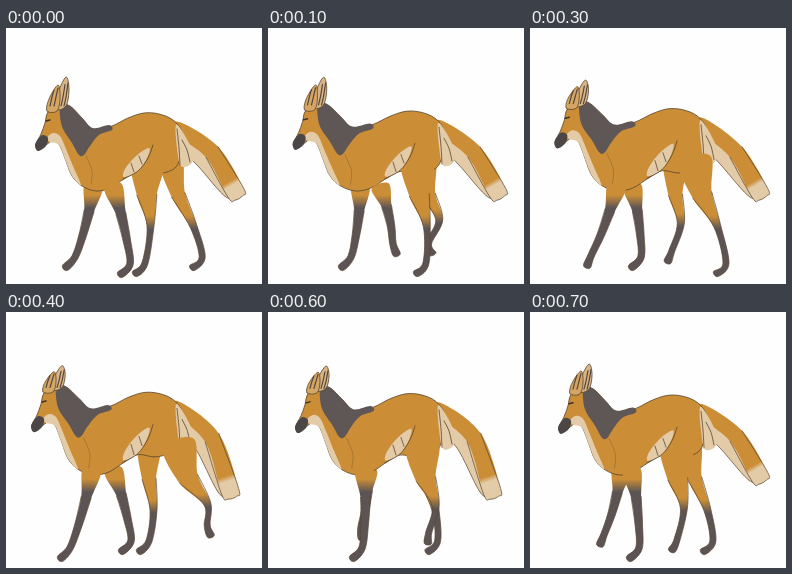
An HTML page with a canvas that plays this animation: 256 px wide and 256 px high, repeating every 800 ms.

```html
<!DOCTYPE html>
<html>
<head>
<meta charset="utf-8">
<style>
html, body { margin: 0; width: 100%; height: 100%; overflow: hidden; background: #fefefe; }
canvas { display: block; width: 100vw; height: 100vh; }
</style>
</head>
<body>
<canvas id="stage"></canvas>
<script>
const canvas = document.getElementById('stage');
const ctx = canvas.getContext('2d');
const ratio = window.devicePixelRatio || 1;
canvas.width = innerWidth * ratio;
canvas.height = innerHeight * ratio;

const ORANGE = '#cb8e37', DARK = '#5c5454', CREAM = '#e3cba8', LINE = '#59452fcc';
const STEP = 100, COUNT = 8;

// The foot slides back from `x` by `stride` per step, for `push` steps,
// then swings forward; it is in the air from step `off` on.
const legs = {
  frontNear: { phase: 4, x: 54, stride: 15, push: 5, off: 4, snap: 3, lift: 20, ground: 247 },
  frontFar: { phase: 0, x: 59, stride: 14, push: 5, off: 4, snap: 1.7, lift: 16, ground: 240 },
  hindNear: { phase: 0, x: 129, stride: 19, push: 4, off: 3, snap: 1.3, lift: 22, ground: 246, hind: true },
  hindFar: { phase: 4, x: 133, stride: 13.3, push: 4, off: 4, snap: 1.8, lift: 14, ground: 240, hind: true, slim: 0.7 }
};

const clamp = v => Math.max(0, Math.min(1, v));
const mix = (a, b, k) => a + (b - a) * k;
const arc = u => Math.sin(Math.PI * u);       // 0 - 1 - 0
const flick = u => arc(Math.sqrt(clamp(u)));  // same, with an early peak
const pairs = a => a.flatMap((v, i) => i % 2 ? [] : [[v, a[i + 1]]]);

// Smooth curve through all points
function curve(p, closed) {
  const n = p.length;
  const at = i => closed ? p[(i + n) % n] : p[Math.max(0, Math.min(n - 1, i))];
  ctx.beginPath();
  ctx.moveTo(...p[0]);
  for (let i = 0; i < (closed ? n : n - 1); i++) {
    const [a, b, c, d] = [at(i - 1), at(i), at(i + 1), at(i + 2)];
    ctx.bezierCurveTo(b[0] + (c[0] - a[0]) / 6, b[1] + (c[1] - a[1]) / 6,
      c[0] - (d[0] - b[0]) / 6, c[1] - (d[1] - b[1]) / 6, c[0], c[1]);
  }
}

function stroke(color, width = 1) {
  ctx.strokeStyle = color;
  ctx.lineWidth = width;
  ctx.stroke();
}

function shape(p, fill, line) {
  curve(p, true);
  ctx.fillStyle = fill;
  ctx.fill();
  if (line) stroke(line);
}

// Tapered limb, outlined along its sides from the given joint
function limb(p, widths, fill, from = 1) {
  const left = [], right = [];
  p.forEach(([x, y], i) => {
    const a = p[Math.max(0, i - 1)], b = p[Math.min(p.length - 1, i + 1)];
    const dx = b[0] - a[0], dy = b[1] - a[1], k = widths[i] / 2 / Math.hypot(dx, dy);
    left.push([x + dy * k, y - dx * k]);
    right.unshift([x - dy * k, y + dx * k]);
  });
  shape([...left, ...right], fill);
  curve([...left.slice(from), ...right.slice(0, right.length - from)], false);
  stroke(LINE, 0.9);
}

function leg({ phase, x, stride, push, off, snap, lift, ground, hind, slim = 1 }, t) {
  const p = (t + phase) % COUNT;
  const swing = clamp((p - push) / (COUNT - push));
  const air = flick((p - off) / (COUNT - off));
  const toe = [x + (p < push ? stride * p : stride * push * (1 - swing) ** snap), ground - lift * air];
  const ankle = [toe[0] + 10 - 14 * air, toe[1] - 11];
  const fur = y => {
    const g = ctx.createLinearGradient(0, y, 0, y + 13);
    g.addColorStop(0, ORANGE);
    g.addColorStop(1, DARK);
    return g;
  };
  if (hind) {
    const hip = [157 + 0.4 * (toe[0] - 167), 131];
    const knee = [hip[0] + 0.15 * (toe[0] - 135), 167];
    const hock = [173 + 0.75 * (toe[0] - 167), 198 - 6 * air];
    limb([hip, knee, hock, ankle, toe], [32 * slim, 20 * slim, 7, 6, 7], fur(hock[1] - 10));
  } else {
    const top = [96 + 0.35 * (toe[0] - 83), 158];
    const along = k => [mix(top[0], ankle[0], k) + 2, mix(top[1], ankle[1], k)];
    limb([top, along(0.35), along(0.7), ankle, toe], [18, 10, 7.5, 6.5, 7], fur(167));
  }
}

function tail([x, y], t) {
  const droop = Math.sqrt(Math.max(0, Math.cos((t - 5) * Math.PI / 4)));
  const mid = [206, 124 + 2 * droop];
  const tip = [230 - 7 * droop, 165 + 17 * droop];
  const end = [mix(mid[0], tip[0], 1.12), mix(mid[1], tip[1], 1.12)];
  const fur = ctx.createLinearGradient(...mid, ...tip);
  fur.addColorStop(0.72, ORANGE);
  fur.addColorStop(0.82, CREAM);
  limb([[x + 3, y + 12], [mid[0] - 9, mid[1] + 7], [tip[0] - 4, tip[1]]], [14, 17, 14], CREAM, 0);
  limb([[x, y], mid, tip, end], [12, 16, 18, 9], fur);
}

function draw(t) {
  const u = t / COUNT;
  const headX = -5 * flick(u), headY = -3 * arc(u), backY = -4.5 * arc(u), earY = 8 * arc(u ** 1.4);

  // Blend the head's movement into that of the back; the chest stays level
  const move = ([x, y]) => {
    const w = clamp((x - 60) / 60);
    return [x + headX * (1 - w), y + mix(headY, backY, w) * clamp((155 - y) / 35)];
  };
  const part = (a, fill, line) => shape(pairs(a).map(move), fill, line);
  const mark = (a, color = LINE, width = 1) => {
    curve(pairs(a).map(move), false);
    stroke(color, width);
  };

  ctx.setTransform(canvas.width / 256, 0, 0, canvas.height / 256, 0, 0);
  ctx.fillStyle = '#fefefe';
  ctx.fillRect(0, 0, 256, 256);
  ctx.lineCap = ctx.lineJoin = 'round';

  leg(legs.frontFar, t);
  leg(legs.hindFar, t);
  tail(move([170, 99]), t);

  // Body
  part([42,84, 39,95, 35,106, 30,116, 32,122, 40,117, 48,112, 54,118, 60,133, 66,148,
    76,158, 90,163, 104,160, 118,151, 132,144, 150,146, 169,140, 176,122, 176,104,
    167,92, 153,86, 138,85, 122,90, 106,98, 88,102, 76,90, 64,78, 54,77], ORANGE, LINE);
  part([170,97, 178,106, 187,125, 185,136, 175,138, 171,120], CREAM);
  mark([171,101, 173,120, 174,137]);
  mark([176,112, 181,122, 184,134]);

  leg(legs.frontNear, t);
  leg(legs.hindNear, t);

  // Belly
  part([118,149, 119,141, 130,128, 143,120, 141,130, 132,143], CREAM);
  mark([117,151, 132,143, 142,130, 147,117]);
  mark([125,135, 128,144]);
  mark([133,128, 136,136]);
  mark([80,128, 86,143, 85,156], '#8a622a88');

  // Throat, mane and muzzle
  part([41,110, 47,105, 54,108, 60,121, 67,138, 75,157, 66,148, 59,131, 53,117, 44,114], CREAM);
  part([55,76, 64,78, 76,90, 87,100, 103,97, 106,102, 93,107, 84,118, 78,127, 73,127,
    66,115, 57,101, 54,88], '#5f5756');
  part([37,107, 42,110, 40,118, 32,123, 29,117, 33,110], '#4c4646');
  mark([40,93, 44,92], '#3f3029', 1.5);

  // Ears droop at the tip
  const ear = a => a.map((v, i) => i % 2 ? v + earY * Math.max(0, (80 - v) / 30) : v);
  part(ear([50,81, 52,65, 60,49, 63,61, 60,78]), '#d9b586', LINE);
  part(ear([41,83, 43,71, 52,57, 54,70, 51,83]), '#d5a663', LINE);
  for (const x of [44, 48, 55, 58]) {
    mark(ear([x, 78, x + 2, 69, x + 4, 62 - (x - 44) / 2]), '#57473c', 1.2);
  }
}

const start = performance.now();
let shown = -1;
function tick(now) {
  const t = Math.floor(Math.max(0, now - start) / STEP) % COUNT;
  if (t !== shown) draw(shown = t);
  requestAnimationFrame(tick);
}
tick(start);
</script>
</body>
</html>
```
